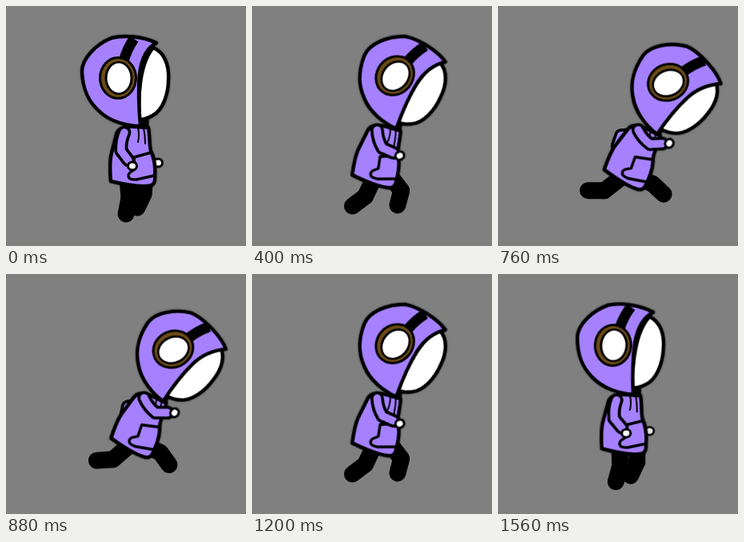
An HTML page for the animation above (1600 ms loop, 300 px wide and 300 px high).

```html
<!DOCTYPE html>
<html lang="en">
<head>
<meta charset="utf-8">
<title>Leaning hoodie</title>
<style>
  /* --p is the lean: 0 upright, 1 fully forward */
  @property --p { syntax: "<number>"; inherits: true; initial-value: 0; }

  html, body { margin: 0; width: 100%; height: 100%; overflow: hidden; background: #808080; }
  svg { display: block; width: 100vw; height: 100vh; animation: lean 1.6s steps(20) infinite; }
  @keyframes lean { 0%, 100% { --p: 0; } 50% { --p: 1; } }

  path, ellipse { stroke-linecap: round; stroke-linejoin: round; }
  .line { fill: none; stroke: #000; stroke-width: 3.4px; }
  .cloth { fill: #a681ff; stroke: #000; stroke-width: 4.4px; }
  .skin { fill: #fff; stroke: #000; stroke-width: 4.4px; }
  .hand { fill: #fff; stroke: #000; stroke-width: 3px; }
  .ink-limb { fill: none; stroke: #000; stroke-width: 17px; }
  .cloth-limb { fill: none; stroke: #a681ff; stroke-width: 9.5px; }
  .leg { fill: none; stroke: #000; stroke-width: 21px; }
  .soft { filter: drop-shadow(0 0 1px rgb(0 0 0 / .5)); }

  .head { transform-origin: 168px 204px; transform: rotate(calc(var(--p) * 38deg)); }
  .nod { transform-origin: 140px 90px; transform: rotate(calc(var(--p) * (1 - var(--p)) * 18deg)); }
  .ring { transform-origin: 140px 90px; transform: rotate(calc(var(--p) * 32deg)); }
  .body {
    transform-origin: 167px 219px;
    transform: translateX(calc(var(--p) * (var(--p) - 1) * 26px)) rotate(calc(var(--p) * 25deg));
  }

  .near-arm { transform-origin: 148px 156px; transform: rotate(calc(var(--p) * -78deg)); }
  .near-fore { transform-origin: 144px 181px; transform: rotate(calc(var(--p) * -6deg)); }
  .far-arm { transform-origin: 157px 158px; transform: rotate(calc(var(--p) * var(--p) * 88deg)); }
  .far-fore { transform-origin: 166px 184px; transform: rotate(calc(var(--p) * -21deg)); }
  .tucked { opacity: calc(1 - var(--p) * 4); }

  .back-thigh { transform-origin: 152px 216px; transform: rotate(calc(var(--p) * 60deg)); }
  .back-shin { transform-origin: 154px 240px; transform: rotate(calc(var(--p) * 23deg)); }
  .front-thigh {
    transform-origin: 174px 214px;
    transform: rotate(calc(var(--p) * (var(--p) * 20 - 95) * 1deg));
  }
  .front-shin {
    transform-origin: 172px 235px;
    transform: rotate(calc(var(--p) * (95 - var(--p) * 20 - var(--p) * var(--p) * 84) * 1deg));
  }

  .hood { animation: hood 1.6s steps(20) infinite; }
  @keyframes hood {
    0%, 100% { d: path("M188 46C170 38 148 36 132 40C112 48 95 66 95 82C96 106 104 120 116 131C130 145 152 150 168 150C166 128 165 105 167 84C170 64 176 53 188 46Z"); }
    50% { d: path("M194 52C182 43 150 36 132 40C112 48 95 66 95 82C96 106 104 120 116 131C130 145 152 150 168 150C167 130 168 108 171 92C174 74 183 62 194 52Z"); }
  }
</style>
</head>
<body>
<svg viewBox="0 0 300 300">
  <defs>
    <g id="near">
      <g class="near-arm">
        <path d="M148 158Q143 169 144 181"/>
        <g class="near-fore"><path d="M144 181L153 193"/></g>
      </g>
    </g>
    <g id="far">
      <g class="far-arm">
        <path d="M157 158L166 184"/>
        <g class="far-fore"><path d="M166 184L178 190"/></g>
      </g>
    </g>
  </defs>

  <g class="body">
    <use href="#far" class="ink-limb"/>
    <use href="#far" class="cloth-limb"/>
    <g class="far-arm"><g class="far-fore">
      <ellipse class="hand tucked" cx="190" cy="196" rx="5.5" ry="5"/>
    </g></g>
  </g>

  <g class="leg">
    <g class="back-thigh">
      <path d="M152 216L154 240"/>
      <g class="back-shin"><path d="M154 240L150 260"/></g>
    </g>
    <g class="front-thigh">
      <path d="M174 214L172 235"/>
      <g class="front-shin"><path d="M172 235L164 252"/></g>
    </g>
  </g>

  <g class="body soft">
    <path class="line" d="M173 143L173 153" style="stroke-width:11px"/>
    <path class="cloth" d="M138 160C141 151 152 150 162 151L178 152C180 164 179 174 181 181C185 190 187 202 186 213C187 221 184 225 176 225C160 226 143 222 131 219C130 207 129 195 132 184Z"/>
    <path class="line" d="M182 183L160 189L161 204C157 207 153 208 153 212C153 217 158 217 163 217L185 212"/>
    <path class="line" d="M165 152Q167 162 165 170M172 152Q174 162 174 172" style="stroke-width:2px"/>
    <use href="#near" class="ink-limb"/>
    <use href="#near" class="cloth-limb"/>
    <g class="near-arm"><g class="near-fore">
      <ellipse class="hand" cx="158" cy="200" rx="5.5" ry="5"/>
    </g></g>
  </g>

  <g class="head soft"><g class="nod">
    <path class="skin" d="M184 52C198 58 204 74 203 92C203 108 197 130 183 137C176 141 172 142 167 142C165 112 167 72 184 52Z"/>
    <path class="cloth hood" d="M188 46C170 38 148 36 132 40C112 48 95 66 95 82C96 106 104 120 116 131C130 145 152 150 168 150C166 128 165 105 167 84C170 64 176 53 188 46Z"/>
    <path class="line" d="M147 69Q151 54 160 41" style="stroke-width:13px;stroke-linecap:butt"/>
    <g class="ring">
      <ellipse cx="140" cy="90" rx="24" ry="27"/>
      <ellipse cx="140" cy="90" rx="21" ry="24" fill="#6c4b15"/>
      <ellipse cx="141" cy="90" rx="17.5" ry="21"/>
      <ellipse cx="141" cy="90" rx="14.5" ry="18.5" fill="#fff"/>
    </g>
  </g></g>
</svg>
</body>
</html>
```
